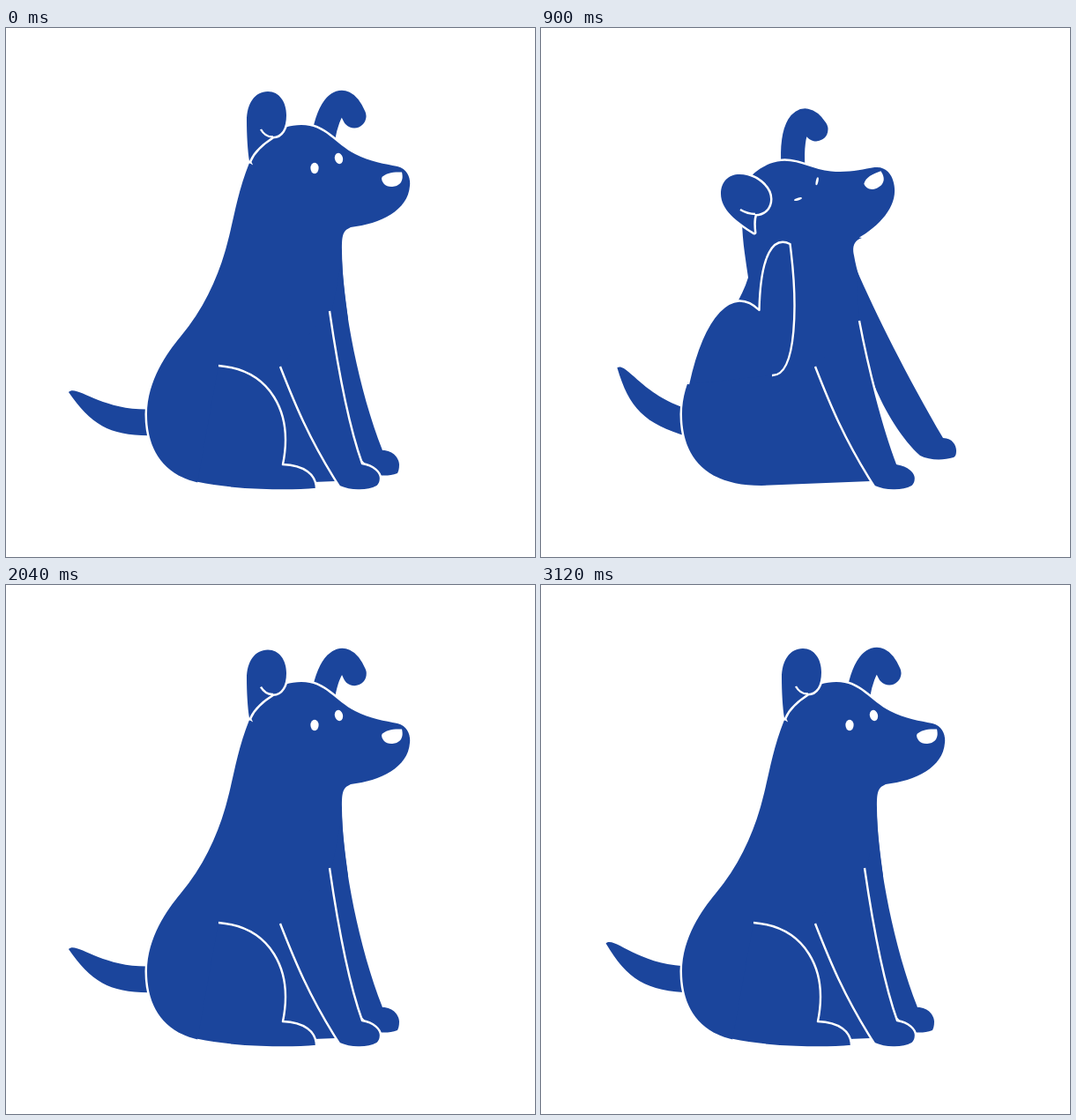
Write an HTML page that moves like this. It is 600 px wide and 600 px high and loops after 3.15 s.

```html
<!DOCTYPE html>
<html lang="en">
<head>
<meta charset="utf-8">
<title>Scratching dog</title>
<style>
  html, body { margin: 0; width: 100%; height: 100%; overflow: hidden; background: #fff; }
  svg { display: block; width: 100vw; height: 100vh; }
  path, ellipse { fill: #1b459c; stroke-linejoin: round; }
  .outlined { stroke: #fff; stroke-width: 5; paint-order: stroke; }
  .lined { stroke: #fff; stroke-width: 2.4; }
  .line { fill: none; }
  .thick { fill: none; stroke: #1b459c; stroke-width: 27; stroke-linecap: round; }
  .white { fill: #fff; }
</style>
</head>
<body>
<svg viewBox="0 0 600 600">
  <path id="tail"/>
  <path id="backEar" class="thick"/>
  <path id="body" class="outlined"/>
  <path id="farLeg"/>
  <path id="hindLeg" class="lined"/>
  <path id="nearLeg" class="lined"/>
  <path id="frontEar" class="outlined"/>
  <path id="curl" class="lined line"/>
  <path id="nose" class="white"/>
  <ellipse id="eyeL" class="white"/>
  <ellipse id="eyeR" class="white"/>
</svg>
<script>
const LOOP = 3150, STEP = 30, BEAT = 245;
const NECK = [414, 332], TILT = -21.3; // the head turns rigidly about this point

const TAIL = 'M71,413 C80,403 110,437 172,432 L172,462 C120,464 98,452 71,413Z';
const HEAD = 'M278,151 C287,125 310,110 335,110 C362,110 374,132 396,143 C413,152 430,154 444,157 C456,160 459,171 458,179 C456,207 425,222 391,226 L330,260Z';
const NOSE = 'M426,170 C430,164 440,163 449,163.5 C452,176 444,180 437,180 C430,180 426,175 426,170Z';

// Sitting and scratching poses.
const TORSO = [
  'M396,225 C381,227 381,236 381,252 C381,280 385,305 388,330 L372,400 L374,514 L250,519 C185,519 160,485 160,438 C160,400 183,368 198,350 C225,318 241,281 250,248 C259,215 262,188 276,153Z',
  'M364,238 C354,241 353,250 355,258 C358,275 363,292 372,310 L372,400 L374,514 L250,519 C185,519 160,485 160,438 C160,400 183,368 198,350 C212,330 228,306 235,283 C232,262 228,240 228,215Z'];
const FAR_LEG = [
  'M381,262 C383,320 400,410 427,479 C440,479 446,489 446,495 C446,500 445,503 444,505 C436,508 428,508 423,507 C385,480 380,450 378,405 L365,345Z',
  'M357,272 C380,325 415,395 456,465 C467,465 471,474 471,479 C471,484 470,486 468,487 C455,491 440,490 430,485 C410,467 390,435 378,405 L362,345Z'];
const NEAR_LEG = [
  'M367,321 C377,390 390,455 404,494 C417,496 425,504 425,511 C425,515 423,519 421,520 C408,527 390,525 378,520 C344,467 327,425 311,384',
  'M361,332 C371,385 388,452 404,494 C417,496 425,504 425,511 C425,515 423,519 421,520 C408,527 390,525 378,520 C344,467 327,425 311,384'];
const BACK_EAR = ['M360,124 C365,95 380,65 395,100', 'M286,158 C283,114 296,90 312,115'];
const FRONT_EAR = [
  'M276,151 C274,140 273,120 273,105 C273,86 282,72 297,72 C310,72 318,84 318,99 C318,114 312,123 303,123 C292,130 281,139 276,151Z',
  'M242,232 C222,220 204,206 204,188 C204,174 213,166 225,166 C243,166 260,180 260,194 C260,205 252,211 243,211 C241,216 241,224 242,232Z'];
const CURL = ['M303,123.5 C297,124 292,120 289,115', 'M243,211 C237,211 231,209 226,206'];

// Sitting, half lifted, scratching.
const HIND_LEG = [
  'M241,383 C300,388 326,436 314,495 C338,496 352,506 352,523 C320,526 260,525 217,516',
  'M209,392 C245,362 278,365 285.5,420 C298,388 330,388 307,444 C290,455 265,464 239,466',
  'M167,404 C184,326 217,290 247.5,320 C249,255 264,236 282.5,245 C291,310 291,395 262,394'];

const mapPoints = (d, fn) => {
  let i = 0;
  return d.replace(/([\d.-]+),([\d.-]+)/g, (_, x, y) => fn(+x, +y, i++).map(v => v.toFixed(2)).join());
};

// Weighted mix of paths that share the same commands.
function mix(paths, weights) {
  const numbers = paths.map(d => d.match(/[\d.-]+/g));
  let i = 0;
  return paths[0].replace(/[\d.-]+/g, () => {
    const v = weights.reduce((sum, w, k) => sum + w * numbers[k][i], 0);
    i++;
    return v.toFixed(2);
  });
}
const lerp = (paths, p) => mix(paths, [1 - p, p]);

function turn(x, y, [cx, cy], deg) {
  const r = deg * Math.PI / 180, c = Math.cos(r), s = Math.sin(r);
  return [cx + (x - cx) * c - (y - cy) * s, cy + (x - cx) * s + (y - cy) * c];
}
const spin = (d, pivot, deg) => mapPoints(d, (x, y) => turn(x, y, pivot, deg));

// Ears are blended in the frame of the upright head.
for (const part of [BACK_EAR, FRONT_EAR, CURL]) part[1] = spin(part[1], NECK, -TILT);

const clamp = v => Math.max(0, Math.min(1, v));
const wave = phase => (1 - Math.cos(2 * Math.PI * phase)) / 2;
const ramp = (t, from, span) => wave(clamp((t - from) / span) / 2);

function tailAngle(t) {
  if (t < 5 * BEAT) return 25 * wave(t / BEAT);
  return t > 2172 ? 25 * wave((t - 2172) / BEAT) : 0;
}

// Downward shift of the ear tops.
function earDrop(t) {
  const swing = (from, count) => {
    const n = (t - from) / 217;
    return n > 0 && n < count ? -6.5 * Math.sin(2 * Math.PI * n) : 0;
  };
  return swing(40, 1) + swing(1490, 3);
}

const squash = (d, base, height, drop, lean) => mapPoints(d, (x, y) => {
  const f = Math.max(0, (base - y) / height) * drop;
  return [x + f * lean, y + f];
});

const el = id => document.getElementById(id);
const setPath = (id, d) => el(id).setAttribute('d', d);

function setEye(id, x, y, ry, tilt, angle) {
  const [cx, cy] = turn(x, y, NECK, angle);
  const attrs = { cx, cy, rx: 4.6, ry, transform: `rotate(${tilt + angle} ${cx} ${cy})` };
  for (const k in attrs) el(id).setAttribute(k, attrs[k]);
}

function draw(t) {
  const p = ramp(t, 345, 210) - ramp(t, 1250, 210);
  const angle = TILT * p;
  const onHead = d => spin(d, NECK, angle);

  setPath('tail', spin(TAIL, [165, 447], tailAngle(t)));
  setPath('body', onHead(HEAD) + lerp(TORSO, p));
  setPath('nose', onHead(NOSE));
  setPath('farLeg', lerp(FAR_LEG, p ** 0.7)); // leads the head a little
  setPath('nearLeg', lerp(NEAR_LEG, p));

  const drop = earDrop(t);
  setPath('backEar', onHead(squash(lerp(BACK_EAR, p), 125, 54, drop, 0.45)));
  setPath('frontEar', onHead(squash(lerp(FRONT_EAR, p), 151, 79, drop, 0)));
  setPath('curl', onHead(squash(lerp(CURL, p), 151, 79, drop, 0)));

  const scratch = wave((t - 900) / 165) * ramp(t, 540, 60) * (1 - ramp(t, 1215, 30));
  const leg = mix(HIND_LEG, [(1 - p) * (1 - 2 * p), 4 * p * (1 - p), p * (2 * p - 1)]);
  setPath('hindLeg', mapPoints(leg, (x, y, i) => i < 3 ? [x, y] : turn(x, y, [258, 385], -6 * scratch)));

  const lid = 1 - 0.85 * wave(clamp((t - 1780) / 180));
  const ry = (6.2 - 4.8 * p) * lid;
  setEye('eyeL', 350, 159, ry, 4 * p, angle);
  setEye('eyeR', 377.5, 148, ry, -14 - 43 * p, angle);
}

const start = performance.now();
function tick() {
  const t = (performance.now() - start) % LOOP;
  draw(Math.floor(t / STEP) * STEP);
  requestAnimationFrame(tick);
}
tick();
</script>
</body>
</html>
```
